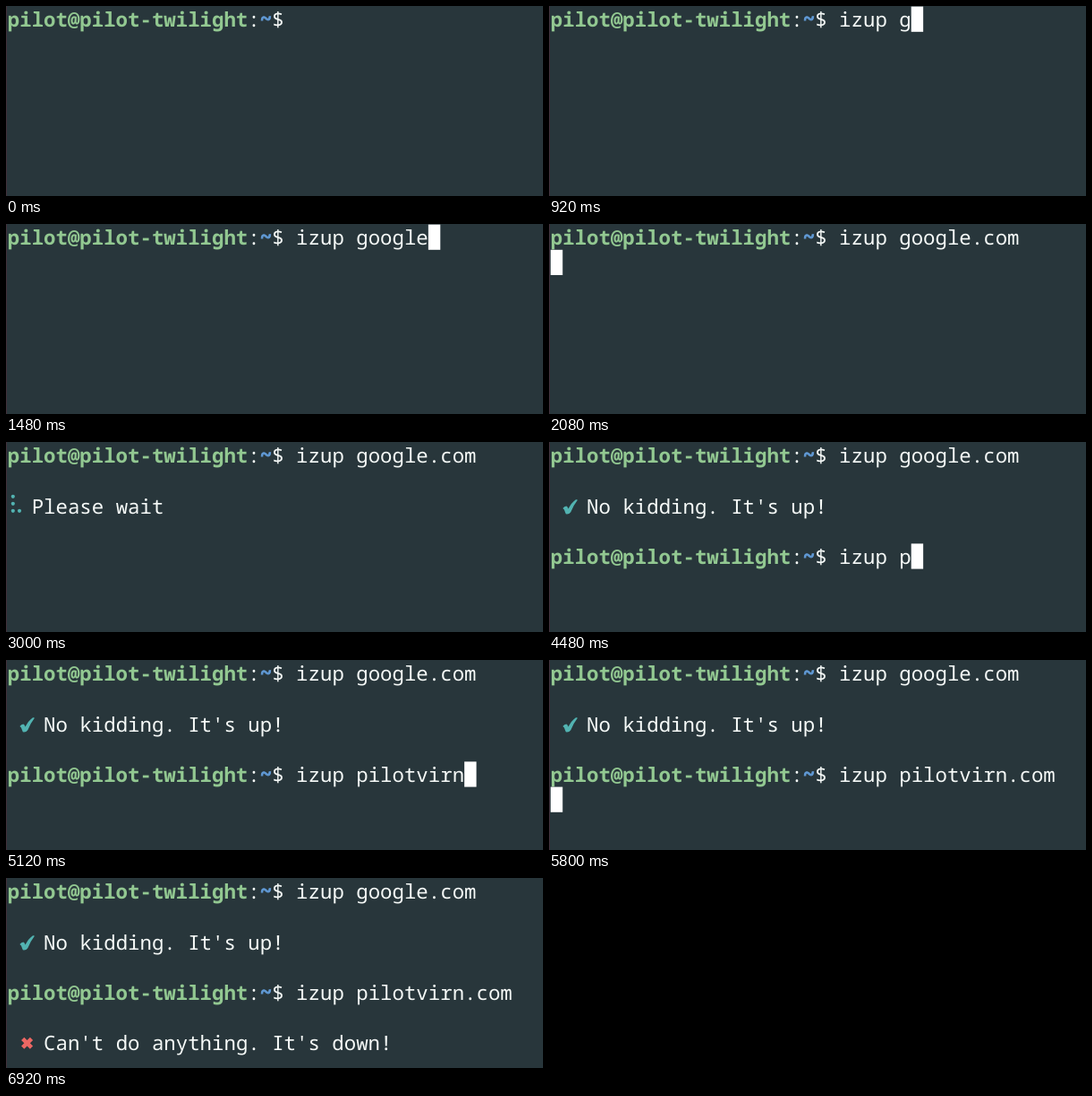
An HTML page that plays this animation: 600x212 px, repeating every 8960 ms.

```html
<!DOCTYPE html>
<html lang="en">
<head>
<meta charset="utf-8">
<title>Terminal session</title>
<style>
  html, body { margin: 0; width: 100%; height: 100%; overflow: hidden; background: #28363b; }
  svg { display: block; width: 600px; height: 212px; }
  text {
    font: 22.383px "Noto Sans Mono", "DejaVu Sans Mono", monospace;
    font-variant-ligatures: none;
    text-rendering: geometricPrecision;
    white-space: pre;
    fill: #f6faf8;
  }
  .host { font-weight: 700; fill: #92c891; }
  .path { font-weight: 700; fill: #619ad6; stroke: #619ad6; stroke-width: 0.9; }
  .teal { fill: #52b3b1; }
  .cross { stroke: #ec6763; stroke-width: 4.6; }
</style>
</head>
<body>
<svg id="stage" viewBox="0 0 600 212">
  <rect width="600" height="212" fill="#28363b"/>
  <rect width="1" height="212" fill="#40303a"/>
</svg>
<script>
const LOOP = 8960, TICK = 40, SPIN = 71;
const CELL = 13.43, ROW = 28.2, LEFT = 1.8, BASELINE = 23.2;
const stage = document.getElementById('stage');

// Each burst: first key time, last key time, characters.
const firstCommand = [
  [280, 680, 'izup '], [920, 1120, 'goo'], [1280, 1320, 'gl'],
  [1480, 1520, 'e.'], [1720, 1880, 'com']
];
const secondCommand = [
  [3720, 3920, 'izu'], [4080, 4120, 'p '], [4480, 5120, 'pilotvirn'],
  [5280, 5280, '.'], [5480, 5600, 'com']
];
const PROMPT_COLS = 24;
const spinnerFrames = [...'⠋⠙⠹⠸⠼⠴⠦⠧⠇⠏'].map(c => c.codePointAt(0) - 0x2800);

function add(tag, attrs, parent = stage) {
  const node = document.createElementNS('http://www.w3.org/2000/svg', tag);
  for (const key in attrs) node.setAttribute(key, attrs[key]);
  return parent.appendChild(node);
}

const colX = col => LEFT + CELL * col;
const group = () => add('g', {});

function write(row, col, string, parent = stage) {
  const node = add('text', { x: colX(col), y: BASELINE + ROW * row }, parent);
  node.textContent = string;
  return node;
}

function prompt(row) {
  const node = write(row, 0, '');
  const parts = [['host', 'pilot@pilot-twilight', 0], ['', ':', 0], ['path', '~', -1.4], ['', '$', 1.4]];
  for (const [name, string, dy] of parts) {
    add('tspan', { class: name, dy }, node).textContent = string;
  }
  return node;
}

function spinner(row) {
  const box = group();
  write(row, 2, 'Please wait', box);
  // Braille bits 0-2 are the left column, 3-5 the right one.
  const dots = Array.from({ length: 6 }, (_, bit) => add('circle', {
    class: 'teal', r: 2.1,
    cx: bit < 3 ? 7.8 : 15,
    cy: ROW * row + 4.4 + 8 * (bit % 3)
  }, box));
  return { box, dots };
}

function show(node, visible) {
  node.setAttribute('visibility', visible ? 'visible' : 'hidden');
}

function typed(bursts, t) {
  return bursts.map(([start, end, chars]) => {
    if (t < start) return '';
    const gap = (end - start) / Math.max(1, chars.length - 1) || 1;
    return chars.slice(0, 1 + Math.floor((t - start) / gap));
  }).join('');
}

function spin({ box, dots }, t, start, end, lastStep) {
  const visible = t >= start && t < end;
  show(box, visible);
  const step = Math.min(lastStep, Math.max(0, Math.floor((t - start) / SPIN)));
  const bits = spinnerFrames[step % spinnerFrames.length];
  dots.forEach((dot, bit) => show(dot, visible && bits >> bit & 1));
}

prompt(0);
const secondPrompt = prompt(4);
const firstLine = write(0, PROMPT_COLS, '');
const secondLine = write(4, PROMPT_COLS, '');
const firstWait = spinner(2);
const secondWait = spinner(6);

const success = group();
add('path', {
  class: 'teal',
  d: 'M15.4 74Q17 71.4 19.4 71.4Q20.8 71.7 21.6 74.6Q25 67.8 30 64.3Q31.6 63.8 31.9 64.8Q27.5 70.4 24.3 78.3Q22.8 80.6 20 80.6Q18.6 80.6 18.1 78.4Q17.2 75 15.4 74Z'
}, success);
write(2, 3, "No kidding. It's up!", success);

const failure = group();
add('path', { class: 'cross', d: 'M18.7 179.4l9.8 9.8m0-9.8l-9.8 9.8' }, failure);
write(6, 3, "Can't do anything. It's down!", failure);

const cursor = add('rect', { width: CELL, height: ROW, fill: '#fff' });

function placeCursor(t, first, second) {
  let place = null;
  if (t >= 280 && t < 2080) place = [0, PROMPT_COLS + first.length];
  else if (t >= 2080 && t < 2480) place = [1, 0];
  else if (t >= 3400 && t < 5800) place = [4, PROMPT_COLS + second.length];
  else if (t >= 5800 && t < 6080) place = [5, 0];
  show(cursor, place);
  if (!place) return;
  cursor.setAttribute('x', colX(place[1]));
  cursor.setAttribute('y', 0.6 + ROW * place[0]);
}

function draw() {
  const t = Math.floor(performance.now() % LOOP / TICK) * TICK;
  const first = typed(firstCommand, t);
  const second = typed(secondCommand, t);
  firstLine.textContent = first;
  secondLine.textContent = second;
  spin(firstWait, t, 2480, 3280, 9);
  spin(secondWait, t, 6080, 6920, 11);
  show(success, t >= 3280);
  show(secondPrompt, t >= 3320);
  show(failure, t >= 6920);
  placeCursor(t, first, second);
  requestAnimationFrame(draw);
}
draw();
</script>
</body>
</html>
```
